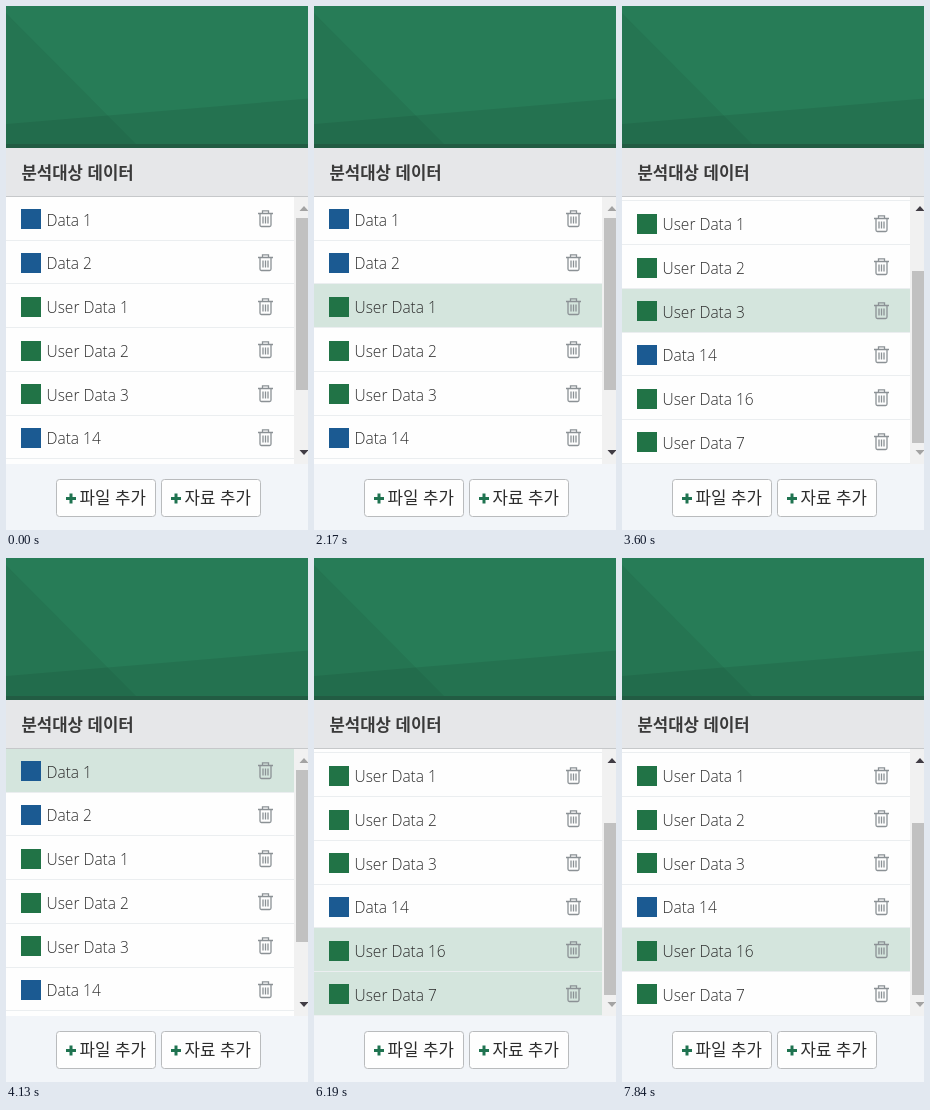
An HTML page that plays this animation: 302 px wide and 524 px high, repeating every 8000 ms.

```html
<!DOCTYPE html>
<html lang="ko">
<head>
<meta charset="utf-8">
<style>
  html, body { margin: 0; width: 100%; height: 100%; overflow: hidden; background: #fefefe; }
  svg { display: block; }
  text { font: 300 15.5px "Open Sans", "Noto Sans", sans-serif; fill: #2c2c2c; }
  .ko { font: 300 16.8px "Noto Sans CJK KR", sans-serif; }
  .title { font-size: 16.7px; font-weight: 700; fill: #3a3a3a; }
</style>
</head>
<body>
<svg width="302" height="524" viewBox="0 0 302 524">
  <defs>
    <path id="trash" fill="none" stroke="#8b9195" stroke-width="1.3"
      d="M0 3.5H15M4.5 3V.8H10.5V3M2 4V15Q2 16.5 3.4 16.5H11.6Q13 16.5 13 15V4M5 6.5V13.5M7.5 6.5V13.5M10 6.5V13.5"/>
    <g id="button">
      <rect x=".5" y=".5" width="99" height="37" rx="3" fill="#fefefe" stroke="#b9bbbd"/>
      <path d="M10 19.5H20M15 14.5V24.5" stroke="#1f7350" stroke-width="3"/>
    </g>
  </defs>

  <g id="list"></g>

  <g id="scrollbar">
    <rect x="288" y="191" width="14" height="267" fill="#f1f1f1"/>
    <rect id="thumb" x="290" width="13" height="172"/>
    <path id="up" d="M293.5 205L298 200L302.5 205Z"/>
    <path id="down" d="M293.5 444L298 449L302.5 444Z"/>
  </g>

  <rect width="302" height="142" fill="#277c57"/>
  <path d="M0 7L130 138H0Z" opacity=".06"/>
  <path d="M0 118L302 92.5V138H0Z" opacity=".08"/>
  <rect y="138" width="302" height="4" fill="#225c43"/>
  <rect y="142" width="302" height="49" fill="#e6e7e9"/>
  <rect y="190" width="302" height="1" fill="#c6c8ca"/>
  <text class="ko title" x="15.5" y="173">분석대상 데이터</text>

  <rect y="458" width="302" height="66" fill="#f2f5f9"/>
  <use href="#button" x="50" y="473"/>
  <use href="#button" x="155" y="473"/>
  <text class="ko" x="73.5" y="498">파일 추가</text>
  <text class="ko" x="178.5" y="498">자료 추가</text>

  <g id="cursor">
    <circle r="15" fill="#f7f45c" opacity=".88"/>
    <path d="M.5 0V16.5L4.3 13L7 19L9.5 18L6.9 12H12Z" fill="#fff" stroke="#333"/>
  </g>
</svg>
<script>
const LOOP = 8000, TOP = 191, PITCH = 43.7, SCROLL = 83, HOVER = 870, LEAVE = 1650;
const BLUE = '#1b5a92', GREEN = '#217346';
const names = ['Data 1', 'Data 2', 'User Data 1', 'User Data 2',
  'User Data 3', 'Data 14', 'User Data 16', 'User Data 7'];
const LAST = names.length - 1;

// The selection spans anchor to focus; the list scrolls to keep focus in view.
const history = [{ time: 0, anchor: -1, focus: -1, scroll: 0 }];

function select(time, anchor, focus) {
  let { scroll } = history.at(-1);
  if (focus > 5) scroll = SCROLL;
  if (focus < 2) scroll = 0;
  history.push({ time, anchor, focus, scroll });
}

function press(start, interval, count, step, shift) {
  for (let i = 0; i < count; i++) {
    const { anchor, focus } = history.at(-1);
    const next = focus + step;
    select(start + i * interval, shift ? anchor : next, next);
  }
}

select(970, 0, 0);
press(2010, 155, 5, 1);
press(2870, 130, 2, 1);
press(3340, 130, 7, -1);
select(5010, LAST, 0);
select(5600, LAST, LAST);
press(6190, 160, 4, -1, true);
press(7060, 150, 4, 1, true);
press(7840, 0, 1, -1);

const $ = id => document.getElementById(id);
const set = (el, attrs) => {
  for (const key in attrs) el.setAttribute(key, attrs[key]);
  return el;
};
const add = (tag, attrs) => set($('list').appendChild(
  document.createElementNS('http://www.w3.org/2000/svg', tag)), attrs);

const rows = names.map(name => {
  const row = {
    back: add('rect', { width: 288 }),
    line: add('rect', { width: 288, height: 1, fill: '#ebeef0' }),
    icon: add('rect', { x: 15, width: 20, height: 20, fill: name.startsWith('User') ? GREEN : BLUE }),
    label: add('text', { x: 40.5 }),
    trash: add('use', { href: '#trash', x: 252 })
  };
  row.label.textContent = name;
  return row;
});

function ease(t, start, end) {
  const u = Math.min(1, Math.max(0, (t - start) / (end - start)));
  return u * u * (3 - 2 * u);
}

const curve = (u, a, b, c) => a * (1 - u) ** 2 + 2 * b * u * (1 - u) + c * u * u;

function cursorAt(t) {
  const enter = ease(t, 180, 730), exit = ease(t, 1100, LEAVE);
  return [curve(enter, 249, -50, 118) + 204 * exit,
          curve(enter, 536, 330, 218) + 5 * exit];
}

function draw(t) {
  const { anchor, focus, scroll } = history.findLast(state => state.time <= t);
  const first = Math.min(anchor, focus), last = Math.max(anchor, focus);
  const [cx, cy] = cursorAt(t);
  const hover = t >= HOVER && t < LEAVE + 30;

  rows.forEach((row, i) => {
    const top = TOP + PITCH * i - scroll;
    const y = Math.round(top), end = Math.round(top + PITCH);
    const selected = i >= first && i <= last;
    const hovered = i === 0 && hover && cx < 288;
    set(row.back, { y, height: end - y, fill: selected ? '#d4e5dd' : hovered ? '#f0f2f1' : '#fefefe' });
    set(row.line, { y: end - 1 });
    set(row.icon, { y: Math.round(top + 12.4) });
    set(row.label, { y: Math.round(top + 28.7) });
    set(row.trash, { y: Math.round(top + 13.2) });
  });

  set($('thumb'), { y: scroll ? 265 : 212, fill: hover && cx >= 290 ? '#a8a8a8' : '#c1c1c1' });
  set($('up'), { fill: scroll ? '#403c44' : '#a3a3a3' });
  set($('down'), { fill: scroll ? '#a3a3a3' : '#403c44' });
  set($('cursor'), {
    transform: `translate(${cx} ${cy})`,
    visibility: t >= 180 && t < LEAVE ? 'visible' : 'hidden'
  });
}

function tick() {
  draw(performance.now() % LOOP);
  requestAnimationFrame(tick);
}
tick();
</script>
</body>
</html>
```
